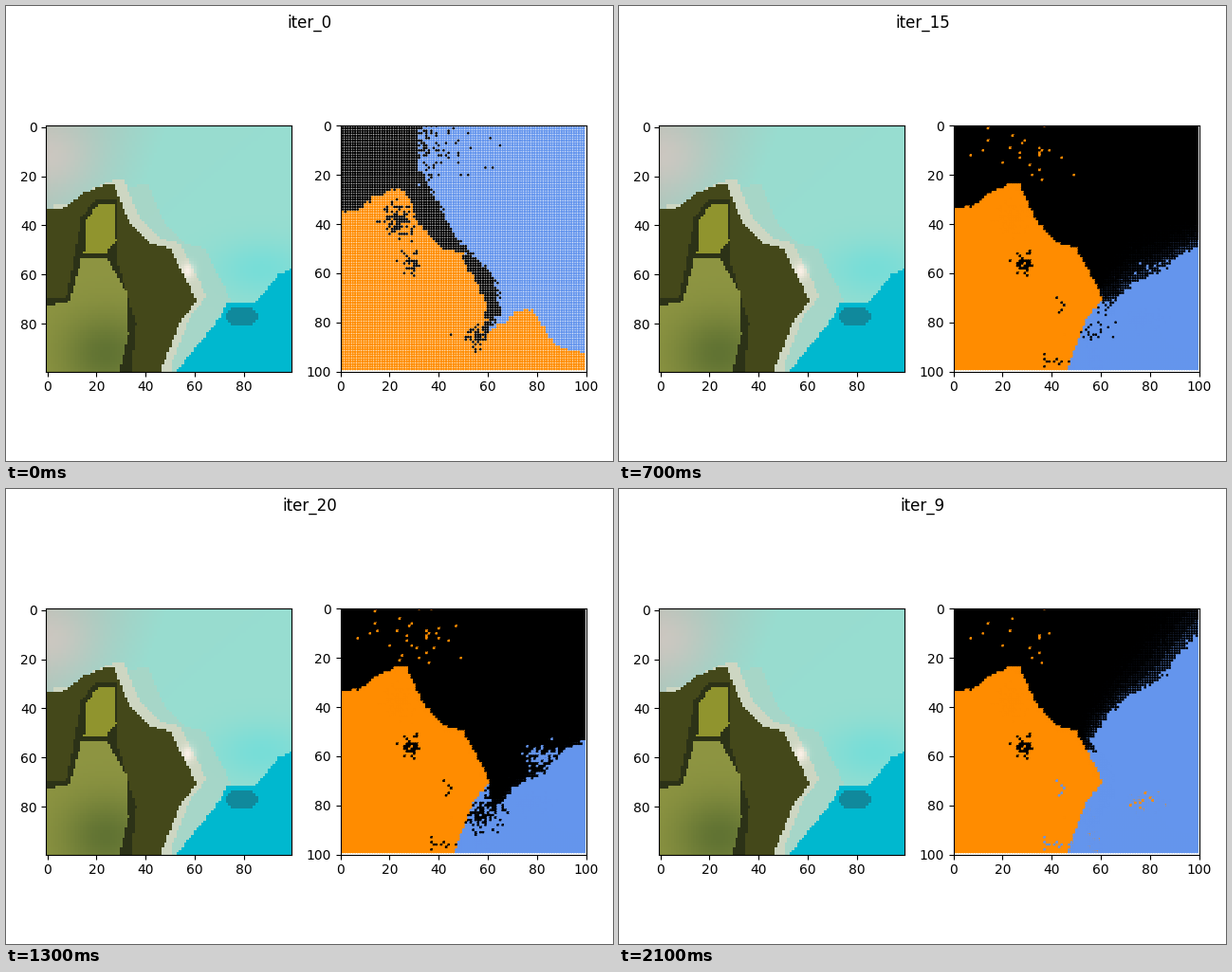
A matplotlib script for the animation above (2.2 s loop, 640 by 480 pixels).

```python
import numpy as np
import matplotlib.pyplot as plt
from matplotlib.animation import FuncAnimation
from matplotlib.colors import to_rgb
from matplotlib.path import Path

W, H, N = 640, 480, 100
STEPS = 22
GAP = 0.3  # share of the older colour left between the dots
BLUE, ORANGE, BLACK = range(3)
PALETTE = np.array([to_rgb(c) for c in ("cornflowerblue", "darkorange", "black")])

rng = np.random.default_rng(7)
gy, gx = np.mgrid[0:N, 0:N].astype(float)
u, u2 = rng.random((2, N, N))
jx, jy = rng.normal(0, 0.55, (2, N, N)) * np.where(rng.random((N, N)) < 0.07, 3, 1)

COAST = np.array([(-1, 33.3), (7, 33), (15, 27), (24, 23.4), (27, 23.6), (33, 38),
                  (42, 47.5), (50, 49.5), (58, 65), (60.5, 71), (54, 79), (50, 89)])

# border between the black and the blue cluster at some steps
FRONTS = {
    0: [(31, -3), (32, 18), (38, 28), (46, 44), (63, 62), (66, 76), (58, 85)],
    3: [(74, -3), (63, 14), (56, 20), (53, 32), (49, 42), (48, 49), (42, 52)],
    9: [(110, -2), (95, 15), (83, 29), (71, 36), (62, 44), (56, 53), (58, 58)],
    11: [(110, 32), (94, 39), (83, 43), (72, 47), (66, 52), (62, 60), (59, 65)],
    19: [(110, 50), (92, 57), (84, 65), (72, 72), (62, 83), (60, 77), (60, 71)],
}


def inside(points, rough=0.0):
    pts = np.column_stack([(gx + rough * jx).ravel(), (gy + rough * jy).ravel()])
    return Path(points).contains_points(pts).reshape(N, N)


def blob(x, y, rx, ry):
    return np.exp(-((gx - x) / rx) ** 2 - ((gy - y) / ry) ** 2)


def land(foot):
    return np.vstack([COAST, [(foot, 99), (foot, 101), (-1, 101)]])


# ---- aerial view in soft tones ----
def aerial():
    img = np.zeros((N, N, 3))

    def tint(color, weight):
        img[:] += (np.array(color) - img) * np.asarray(weight, float)[..., None]

    shore = land(46)
    deep = [(51, 101), (69, 79), (73, 72), (85, 71), (94, 60), (101, 57), (101, 101)]
    hedge = [(-1, 69), (8, 69), (14, 37), (20, 29), (28, 29), (28, 53), (36, 80), (34, 101), (-1, 101)]
    meadow = [(-1, 73), (9, 71), (14, 54), (24, 53), (32, 67), (33, 84), (29, 101), (-1, 101)]
    garden = [(16, 38), (21, 31), (27, 31), (28, 46), (24, 51), (15, 51)]

    tint((152, 221, 208), np.ones((N, N)))
    tint((180, 192, 182), np.clip(1 - (gx + 0.4 * gy) / 50, 0, 1))
    tint((210, 200, 194), 0.8 * blob(0, 12, 18, 14))
    tint((112, 222, 218), 0.8 * blob(87, 58, 20, 12))
    tint((170, 213, 198), 0.8 * inside(shore + (14, 0)))
    tint((0, 184, 207), inside(deep))
    tint((22, 122, 140), 0.75 * (blob(79, 77, 7, 4) > 0.4))
    tint((205, 214, 194), inside(shore + (4, -2)))
    tint((250, 240, 230), blob(57, 58.5, 2.6, 3.2))
    tint((68, 72, 26), inside(shore))
    tint((44, 50, 23), inside(hedge))
    tint((144, 148, 46), inside(garden))
    tint((142, 149, 66), inside(meadow))
    tint((82, 104, 46), 0.75 * inside(meadow) * blob(24, 92, 18, 16))
    return img / 255


# ---- clustering ----
def front(k):
    if k < 3:
        pos = 3 * (k / 3) ** 0.5
    elif k > 11:
        pos = 19 - 8 * max(0, (19 - k) / 8) ** 1.8
    else:
        pos = k
    keys = list(FRONTS)
    lines = np.array(list(FRONTS.values()), float).reshape(len(keys), -1)
    return np.array([np.interp(pos, keys, col) for col in lines.T]).reshape(-1, 2)


def first_labels(lab):
    lab[(lab == BLUE) & (gy < 23) & (u < 0.5 * np.exp(-(gx - 30) / 9))] = BLACK
    low = [(58, 85), (68, 79), (72, 75), (78, 75), (88, 90), (101, 93), (101, 101), (-1, 101)]
    lab[inside(np.vstack([COAST[:-2] + (-1, 2), low]), 0.6)] = ORANGE
    clump = blob(24, 38, 5, 6) + blob(28, 56, 3, 4) + blob(56, 86, 4, 4)
    lab[(lab == ORANGE) & (u < 0.75 * clump)] = BLACK
    return lab


def labels(k):
    lab = np.full((N, N), BLUE)
    line = front(k)
    dark = np.vstack([line, [(30, 62), (-10, 62), (-10, -10), (line[0, 0], -10)]])
    lab[inside(dark, 1.0)] = BLACK
    if k == 0:
        return first_labels(lab)

    # late swaps beside the coast and around the upper bay
    late = np.clip((k - 14) / 5, 0, 1)
    lab[(lab == BLUE) & (u < 0.7 * late * blob(58, 83, 6, 7))] = BLACK
    lab[(lab == BLACK) & (u2 < 0.9 * late * blob(83, 60, 6, 4))] = BLUE

    # orange patches that die out in the water
    fade = max(0, 1 - k / 10)
    lab[u < fade * (blob(77, 79, 5, 3) + 0.8 * blob(57, 95, 3, 5))] = ORANGE

    lab[inside(land(max(46.5, 50.5 - 0.45 * k)), 0.25)] = ORANGE
    lab[u < 0.9 * blob(28, 56, 3, 3.5)] = BLACK
    pits = blob(44, 73, 2, 3) + blob(42, 96, 4, 2)
    lab[(lab == ORANGE) & (u2 < 0.4 * pits)] = BLACK if k > 13 else BLUE
    sparks = 0.08 * min(k, 19) / 19 * blob(28, 12, 16, 9)
    lab[(lab == BLACK) & (gy < 24) & (u < sparks)] = ORANGE
    return lab


def history():
    """Dot colours of each step and the older colours between the dots."""
    under = np.ones((N, N, 3))
    for k in range(STEPS):
        dots = PALETTE[labels(k)]
        yield dots.reshape(-1, 3), under
        under = GAP * under + (1 - GAP) * dots


FRAMES = list(history())
ORDER = sorted(range(STEPS), key=str)

# ---- figure ----
fig = plt.figure(figsize=(W / 100, H / 100), dpi=100)
SIDE, TOP = 259.07, 126.5


def add_axes(left, last):
    ax = fig.add_axes([left / W, 1 - (TOP + SIDE) / H, SIDE / W, SIDE / H])
    ax.set_xticks(range(0, last + 1, 20))
    ax.set_yticks(range(0, last + 1, 20))
    return ax


photo = add_axes(42.35, 80)
photo.imshow(aerial(), aspect="auto", interpolation="nearest")

plot = add_axes(352.65, 100)
back = plot.imshow(FRAMES[0][1], aspect="auto", interpolation="nearest", vmin=0, vmax=1)
cells = plot.scatter(gx.ravel(), gy.ravel(), s=1, c=FRAMES[0][0])
plot.set_xlim(0, 100)
plot.set_ylim(100, 0)
title = fig.suptitle("iter_0", y=0.982)


def update(i):
    k = ORDER[i]
    dots, under = FRAMES[k]
    title.set_text(f"iter_{k}")
    back.set_data(under)
    cells.set_facecolor(dots)


anim = FuncAnimation(fig, update, frames=STEPS, interval=100, repeat=True, repeat_delay=0)
plt.show()
```
